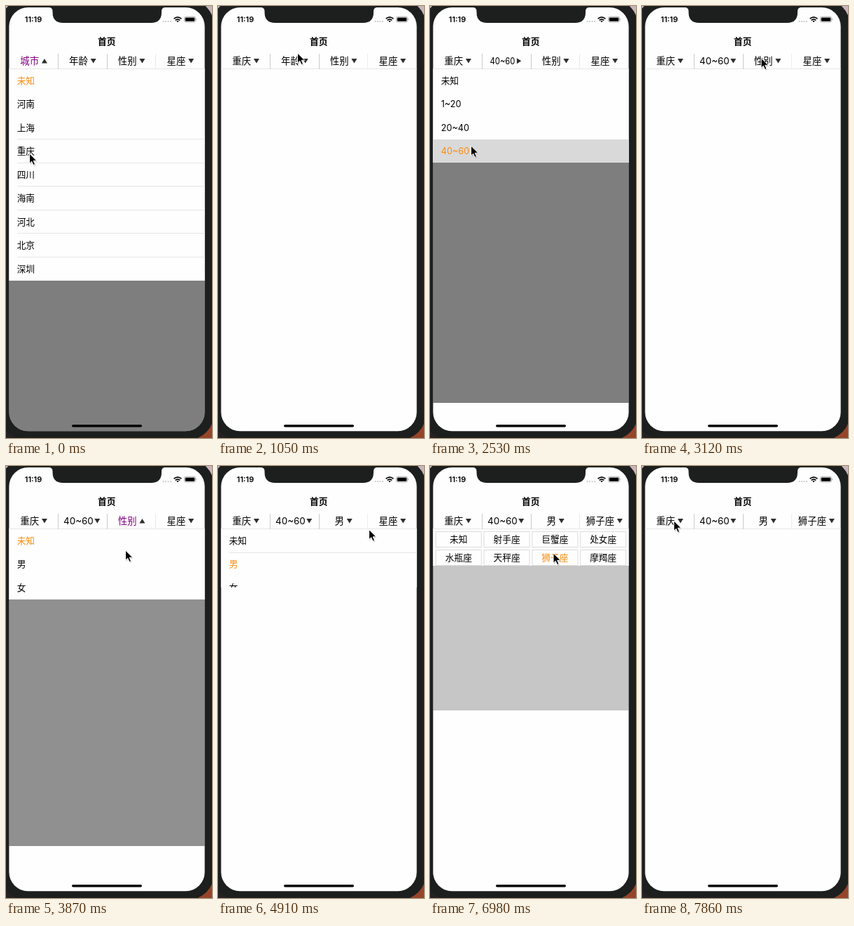
An HTML page that plays this animation: 294 by 615 pixels, repeating every 8000 ms.

```html
<!DOCTYPE html>
<html lang="zh-CN">
<head>
<meta charset="utf-8">
<style>
  html, body { margin: 0; width: 100%; height: 100%; overflow: hidden; background: #1d1f1f; }
  svg { display: block; width: 100vw; height: 100vh; }
  text { font-family: Inter, "Noto Sans CJK SC", "Noto Sans CJK", sans-serif; font-size: 12.7px; fill: #000; }
  .head { font-size: 13.4px; text-anchor: middle; }
  .mid { text-anchor: middle; }
  .bold { font-weight: 600; }
</style>
</head>
<body>
<svg viewBox="0 0 294 615">
  <defs>
    <clipPath id="screen"><rect x="4.4" y="2" width="279.2" height="603.2" rx="27"/></clipPath>
    <clipPath id="listClip"><rect id="listBox" x="4" y="89" width="280" height="0"/></clipPath>
  </defs>
  <rect width="294" height="300" fill="#c9b5bb"/>
  <rect y="300" width="150" height="315" fill="#262122"/>
  <rect x="150" y="300" width="144" height="315" fill="#96452a"/>
  <rect x="-9" y="-10" width="306" height="628" rx="38" fill="#1d1f1f"/>
  <g clip-path="url(#screen)">
    <rect width="294" height="615" fill="#fefefe"/>
    <rect id="shade" x="4" width="280"/>
    <g id="lists" clip-path="url(#listClip)"><rect x="4" y="89" width="280" height="320" fill="#fefefe"/></g>
    <path d="M4 89.5H284" stroke="#e6e6e6"/>
    <path d="M74.5 68V90M144.5 68V90" stroke="#cbcbcb"/>
    <path d="M213.5 68V90" stroke="#ebebeb"/>
    <g id="heads"></g>
    <text class="mid bold" x="143.8" y="55.3">首页</text>
    <text class="bold" x="26.8" y="22.9" style="font-size:11px">11:19</text>
    <g fill="#c4c4c4">
      <circle cx="224.5" cy="22" r="1.1"/><circle cx="228" cy="22" r="1.1"/>
      <circle cx="231.5" cy="22" r="1.1"/><circle cx="235" cy="22" r="1.1"/>
    </g>
    <g fill="none" stroke="#000" stroke-width="1.7">
      <path d="M239.6 18.2Q245 13.4 250.4 18.2M241.7 20.4Q245 17.5 248.3 20.4"/>
      <path d="M243.3 21.4Q245 20.2 246.7 21.4L245 23.2Z" fill="#000" stroke="none"/>
    </g>
    <rect x="254.5" y="15.2" width="16" height="7.8" rx="2.2" fill="none" stroke="#999" stroke-width=".8"/>
    <rect x="255.7" y="16.4" width="13.6" height="5.4" rx="1.2"/>
    <path d="M271.4 17.6Q273 19.1 271.4 20.6Z" fill="#888"/>
    <path d="M61 0V2Q66.5 2 66.5 7.5V9Q66.5 24 81.5 24H207Q222 24 222 9V7.5Q222 2 227.5 2V0Z" fill="#1d1f1f"/>
    <rect x="94" y="596" width="100" height="3.6" rx="1.8"/>
  </g>
  <g id="cursor">
    <path d="M1 1.5V16L4 13L6.5 18L9 17L6.7 12H11Z" fill="#000" opacity=".18"/>
    <path d="M0 0V14.2L3.2 11.2L5.5 16.5L8 15.4L5.7 10.3H10.3Z" stroke="#fff" stroke-width="1" stroke-linejoin="round"/>
  </g>
</svg>
<script>
const LOOP = 8000, TOP = 89.6, ROW = 33.44, FULL = 516;
const ORANGE = '#ff8a0a', PURPLE = '#850085';
const $ = id => document.getElementById(id);

function add(parent, tag, attrs, text) {
  const node = document.createElementNS('http://www.w3.org/2000/svg', tag);
  set(node, attrs);
  if (text) node.textContent = text;
  parent.appendChild(node);
  return node;
}
function set(node, attrs) {
  for (const key in attrs) node.setAttribute(key, attrs[key]);
}

const menus = [
  { name: '城市', items: '未知 河南 上海 重庆 四川 海南 河北 北京 深圳', pick: 3, lines: [3, 4, 5, 6, 7, 8] },
  { name: '年龄', items: '未知 1~20 20~40 40~60', pick: 3, lines: [] },
  { name: '性别', items: '未知 男 女', pick: 1, lines: [1], linesOnClose: true },
  { name: '星座', items: '未知 射手座 巨蟹座 处女座 水瓶座 天秤座 狮子座 摩羯座', pick: 6, lines: [], grid: true }
];

menus.forEach((menu, col) => {
  const items = menu.items.split(' ');
  const group = menu.group = add($('lists'), 'g', {});
  menu.height = menu.grid ? 55.5 : items.length * ROW;
  menu.picked = items[menu.pick];
  if (!menu.grid) menu.mark = add(group, 'rect',
    { x: 4, y: Math.round(TOP + menu.pick * ROW), width: 280, height: Math.round(ROW), fill: '#d9d9d9' });
  menu.texts = items.map((item, i) => {
    if (!menu.grid) return add(group, 'text', { x: 15.7, y: TOP + (i + .5) * ROW + 4.7 }, item);
    const x = 8.3 + (i % 4) * 68.8, y = 93.5 + (i >> 2) * 26;
    add(group, 'rect', { x, y, width: 65, height: 22, fill: 'none', stroke: '#dcdcdc' });
    return add(group, 'text', { x: x + 32.5, y: y + 15.8, class: 'mid' }, item);
  });
  menu.rules = add(group, 'path', {
    d: menu.lines.map(i => `M16 ${Math.floor(TOP + i * ROW) + .5}H284`).join(''), stroke: '#e6e6e6'
  });
  menu.x = 33.7 + col * 69.75;
  menu.label = add($('heads'), 'text', { class: 'head', y: 82.9 });
  menu.arrow = add($('heads'), 'path', { d: 'M-4 -3.2H4L0 3.2Z', fill: '#2e2e2e' });
});

// Each phase runs in n held steps; path entries are [step, x, y].
const phases = [
  { at: 0, end: 0, n: 1, menu: 0, open: true, path: [[0, 33.5, 210]] },
  { at: 450, end: 1050, n: 5, menu: 0, path: [[0, 33.5, 210], [1, 36, 198], [3, 104, 84], [4, 113.5, 67]] },
  { at: 1340, end: 2230, n: 7, menu: 1, open: true, path: [[0, 113.5, 67], [1, 112, 72], [4, 72, 176], [6, 58.5, 199]] },
  { at: 2530, end: 3120, n: 5, menu: 1, path: [[0, 58.5, 199], [1, 76, 178], [3, 157, 90], [4, 170, 74]] },
  { at: 3570, end: 4310, n: 6, menu: 2, open: true, path: [[0, 170, 74], [1, 171, 88], [2, 170.5, 120], [5, 166, 134]] },
  { at: 4610, end: 5340, n: 6, menu: 2, path: [[0, 166, 134], [2, 215.5, 90.5], [3, 231, 65], [5, 240, 74]] },
  { at: 5640, end: 6530, n: 7, menu: 3, open: true, path: [[0, 240, 74], [1, 233, 80], [3, 198.5, 114.5], [6, 180, 128]] },
  { at: 6830, end: 7860, n: 8, menu: 3, path: [[0, 180, 128], [1, 176, 124], [5, 66, 80], [7, 45.5, 78]] }
];

function along(path, step) {
  const next = path.findIndex(p => p[0] >= step);
  const b = path[next], a = path[Math.max(0, next - 1)];
  const f = a === b ? 0 : (step - a[0]) / (b[0] - a[0]);
  return [a[1] + (b[1] - a[1]) * f, a[2] + (b[2] - a[2]) * f];
}

// The shade fades in linearly while its height eases out.
function pose(phase, k) {
  if (phase.open) {
    const settled = k === phase.n - 1;
    const grow = settled ? 1 : 1 - .97 * Math.pow(.36, k);
    const list = Math.min(1, grow * 1.25);
    return { grow, list, alpha: settled ? .5 : Math.min(.5, k * .218), turn: -180 * list };
  }
  return {
    grow: [.922, .5][k] || 0,
    list: [1, .95, .83][k] || 0,
    alpha: [.5, .22][k] || 0,
    turn: k ? 0 : -90
  };
}

function drawHead(menu, col, phase, k, turn, t) {
  const active = phase.menu === col;
  const chosen = phases.some(p => p.menu === col && !p.open && p.at <= t);
  const text = chosen ? menu.picked : menu.name;
  const resizing = active && !phase.open && k === 0 && text.length !== menu.name.length;
  const width = w => (/\d/.test(w) ? 38 : w.length * 13.4);
  const half = resizing ? (width(text) * .43 + width(menu.name) * .57) / 2 : width(text) / 2;
  const squash = resizing && text.length > 3 ? .84 : 1;
  if (menu.label.textContent !== text) menu.label.textContent = text;
  set(menu.label, {
    transform: `translate(${menu.x} 0) scale(${squash} 1)`,
    style: `fill:${active && phase.open ? PURPLE : '#000'}`
  });
  set(menu.arrow, { transform: `translate(${menu.x + half + 7.8} 78.2) rotate(${active ? turn : 0})` });
}

function render(t) {
  const phase = phases.filter(p => p.at <= t).pop();
  const gap = (phase.end - phase.at) / (phase.n - 1);
  const k = phase.n === 1 ? 0 : Math.min(phase.n - 1, Math.floor((t - phase.at) / gap + .05));
  const { grow, list, alpha, turn } = pose(phase, k);
  const shown = menus[phase.menu];
  const listEnd = Math.round(TOP + shown.height * list);

  set($('listBox'), { height: list ? listEnd - 89 : 0 });
  set($('shade'), {
    y: listEnd,
    height: Math.max(0, Math.round(TOP + FULL * grow) - listEnd),
    opacity: alpha
  });

  menus.forEach((menu, col) => {
    menu.group.style.display = menu === shown ? '' : 'none';
    drawHead(menu, col, phase, k, turn, t);
  });
  const selected = phase.open ? 0 : shown.pick;
  shown.texts.forEach((node, i) => { node.style.fill = i === selected ? ORANGE : '#000'; });
  if (shown.mark) set(shown.mark, { opacity: phase.open ? 0 : [1, .5][k] || 0 });
  set(shown.rules, { opacity: shown.linesOnClose && (phase.open || !k) ? 0 : 1 });

  set($('cursor'), { transform: `translate(${along(phase.path, k).join(' ')})` });
}

const begin = performance.now();
function tick() {
  render((performance.now() - begin) % LOOP);
  requestAnimationFrame(tick);
}
tick();
</script>
</body>
</html>
```
